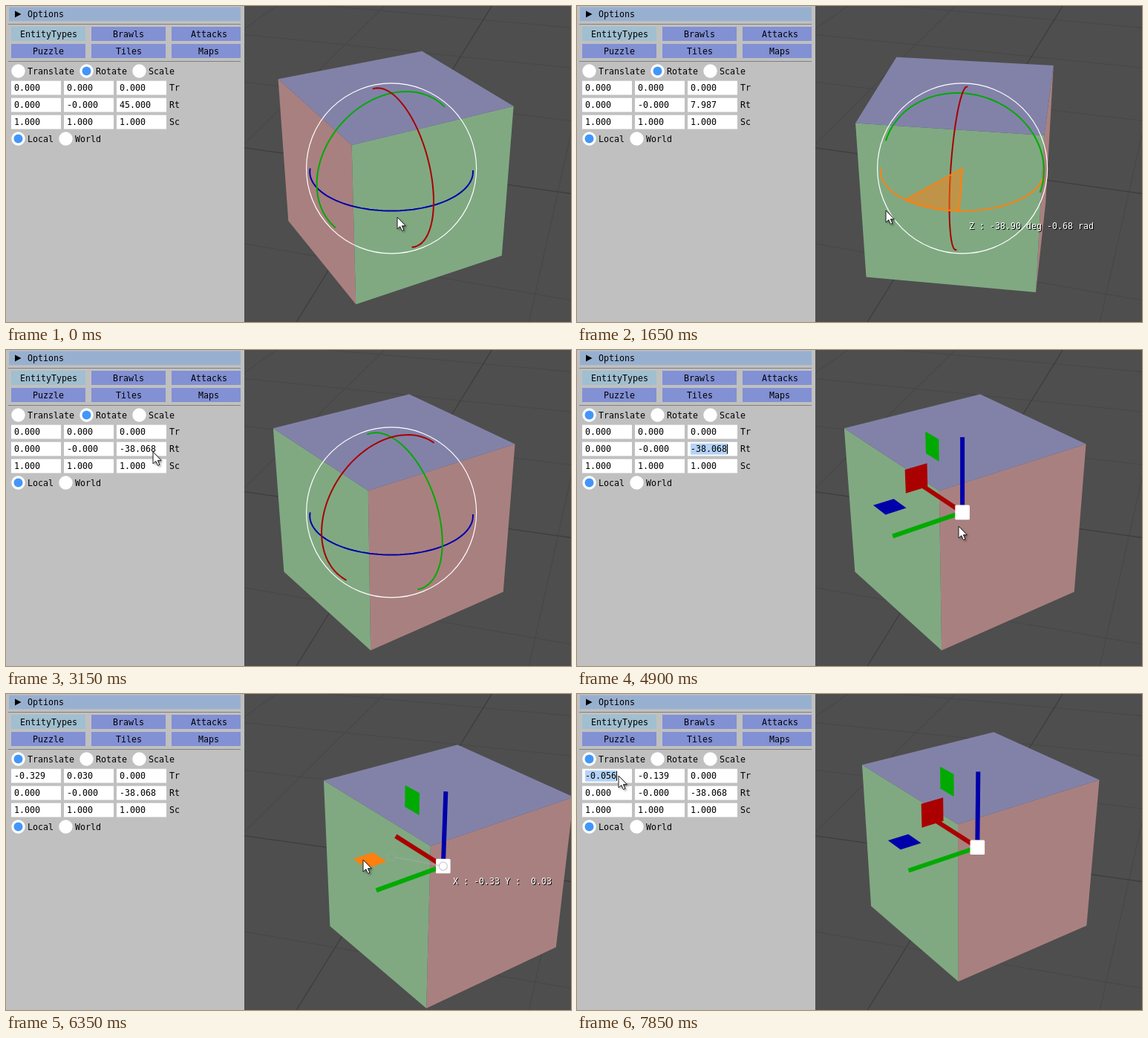
Recreate the animation shown at these times as an HTML page with a canvas. Size 761x425 px, loop 8 s.

```html
<!DOCTYPE html>
<html lang="en">
<head>
<meta charset="utf-8">
<title>Gizmo editor</title>
<style>
  html, body { margin: 0; width: 100%; height: 100%; overflow: hidden; background: #4e4e4e; }
  canvas { display: block; }
</style>
</head>
<body>
<canvas id="stage" width="761" height="425"></canvas>
<script>
const ctx = document.getElementById('stage').getContext('2d');
const LOOP = 8000, STEP = 50, RAD = Math.PI / 180;

// Orbit camera aimed at the origin; u = right, v = away, z = up.
const CAM = { x: 519.1, y: 218.4, focal: 1081, dist: 4.87, c: 0.88, s: 0.4755, yaw: 163.6 };
const RING = 0.493;          // gizmo size in world units at the origin
const GRAB = 268;            // direction where the ring is grabbed
const RED = '#aa0000', GREEN = '#00aa00', BLUE = '#0000aa', ORANGE = '#ff8010';
const GHOST = 'rgba(170,170,170,.6)';

const TURN = [500, 2800], SLIDE = [5600, 7150], SWITCH = 4650;
const during = (t, [from, to]) => t >= from && t < to;

// Keys: [time, value...]
const SPIN = [[450, 45], [850, 37.242], [1650, 7.987], [2600, -38.068]];
const SHIFT = [[5550, 0, 0], [6350, -0.329, 0.03], [7050, -0.056, -0.139]];
// Free pointer moves: [from, to, x, y]
const REST = [527, 284];
const MOVES = [[50, 150, 516, 277], [2800, 3150, 198, 137], [3650, 3900, 122, 110],
  [3900, 4450, 514, 237], [4900, 5300, 414, 211], [7150, 7500, 140, 66], [7500, 7700, 56, 110]];

const clamp = (v, lo, hi) => Math.min(hi, Math.max(lo, v));
const mix = (a, b, k) => a.map((v, i) => v + (b[i] - v) * k);
const smooth = k => k * k * (3 - 2 * k);

function at(keys, t) {
  const i = clamp(keys.findLastIndex(k => k[0] <= t), 0, keys.length - 2);
  const [t0, ...a] = keys[i], [t1, ...b] = keys[i + 1];
  return mix(a, b, clamp((t - t0) / (t1 - t0), 0, 1));
}

const depth = p => CAM.dist + p[1] * CAM.c - p[2] * CAM.s;

function project(p) {
  const k = CAM.focal / depth(p);
  return [CAM.x + p[0] * k, CAM.y - (p[2] * CAM.c + p[1] * CAM.s) * k];
}

// Maps local coordinates to the camera-aligned world
function frame(deg, pos = [0, 0, 0]) {
  const a = (deg + CAM.yaw) * RAD, c = Math.cos(a), s = Math.sin(a);
  return (x, y, z) => [pos[0] + x * c - y * s, pos[1] + x * s + y * c, pos[2] + z];
}
const ground = (deg, r) => project([r * Math.cos(deg * RAD), r * Math.sin(deg * RAD), 0]);

const spin = t => at(SPIN, t)[0];
const place = t => frame(0)(...at(SHIFT, t), 0);
// the readout runs a little ahead of the cube
const swept = t => Math.max((spin(t) - 45) * 1.005 - 1.7, -83.07);

function pointer(t) {
  if (during(t, TURN)) {
    const deg = swept(t);
    return ground(GRAB + deg, Math.min(0.5 - deg * 0.0037, 0.645));
  }
  if (during(t, SLIDE)) {
    const [u, v] = place(t);
    return project([u - 0.478, v + 0.077, 0]);
  }
  const move = MOVES.findLast(m => m[0] <= t);
  if (!move) return REST;
  const [from, to, ...end] = move;
  return mix(pointer(from - STEP), end, smooth(clamp((t - from) / (to - from), 0, 1)));
}

function trace(points, close) {
  ctx.beginPath();
  points.forEach(p => ctx.lineTo(p[0], p[1]));
  if (close) ctx.closePath();
}
function fill(points, color) {
  trace(points, true);
  ctx.fillStyle = color;
  ctx.fill();
}
function line(points, color, width, close) {
  trace(points, close);
  ctx.strokeStyle = color;
  ctx.lineWidth = width;
  ctx.stroke();
}
function box(x, y, w, h, color) {
  ctx.fillStyle = color;
  ctx.fillRect(x, y, w, h);
}
function disc(x, y, r, color) {
  ctx.beginPath();
  ctx.arc(x, y, r, 0, 7);
  ctx.fillStyle = color;
  ctx.fill();
}
function ring(x, y, r, color, width) {
  ctx.beginPath();
  ctx.arc(x, y, r, 0, 7);
  ctx.strokeStyle = color;
  ctx.lineWidth = width;
  ctx.stroke();
}
function text(s, x, y, color = '#000') {
  ctx.fillStyle = color;
  ctx.fillText(s, x, y);
}
function label(s, x, y) {
  text(s, x + 1, y + 1);
  text(s, x, y, '#fff');
}
const num = v => v.toFixed(2).padStart(5);

function drawGrid() {
  const w = frame(0), N = 10;
  for (let i = -N; i <= N; i++) {
    for (const along of [true, false]) {
      const pts = [];
      for (let j = -N; j <= N; j += 0.25) {
        const p = along ? w(j, i, 0) : w(i, j, 0);
        if (depth(p) > 0.6) pts.push(project(p));
      }
      line(pts, i ? '#484848' : '#3d3d3d', 1.3);
    }
  }
}

function drawCube(w) {
  const h = 0.5, corners = [[-h, -h], [h, -h], [h, h], [-h, h]];
  const side = (nx, ny) => corners.map(([a, z]) => project(w(nx * h - ny * a, ny * h + nx * a, z)));
  const faces = [
    [side(1, 0), '#a98080'], [side(-1, 0), '#a98080'],
    [side(0, 1), '#80a982'], [side(0, -1), '#80a982'],
    [corners.map(([x, y]) => project(w(x, y, h))), '#8282a9']
  ];
  for (const [[a, b, c, d], color] of faces) {
    const turn = (b[0] - a[0]) * (c[1] - a[1]) - (b[1] - a[1]) * (c[0] - a[0]);
    if (turn < 0) fill([a, b, c, d], color);
  }
}

function drawRotate(t) {
  const rt = spin(t), w = frame(rt), a = (rt + CAM.yaw) * RAD;
  // viewing direction in local axes
  const view = [CAM.c * Math.sin(a), CAM.c * Math.cos(a), -CAM.s];
  const hot = t >= 100 && t < TURN[1];
  const colors = [hot ? ORANGE : BLUE, GREEN, RED];
  colors.forEach((color, axis) => {
    const p = (3 - axis) % 3, q = (4 - axis) % 3;
    const start = Math.atan2(view[q], view[p]) + Math.PI / 2, pts = [];
    for (let i = 0; i < 64; i++) {
      const g = start + Math.PI * i / 64, v = [0, 0, 0];
      v[p] = RING * Math.cos(g);
      v[q] = RING * Math.sin(g);
      pts.push(project(w(...v)));
    }
    line(pts, color, 2);
  });
  ring(CAM.x, CAM.y, 114.5, '#fff', 1.2);
  if (!during(t, TURN)) return;

  const deg = swept(t), pie = [ground(0, 0)];
  for (let i = 0; i <= 40; i++) pie.push(ground(GRAB + deg * i / 40, RING));
  fill(pie, 'rgba(255,128,16,.5)');
  line(pie, ORANGE, 2, true);
  label(`Z : ${num(deg)} deg ${num(deg * RAD)} rad`, 528, 300);
}

function drawTranslate(t) {
  const pos = place(t), w = frame(spin(t), pos), [x, y] = project(pos);
  const drag = during(t, SLIDE), hot = t >= 5200 && t < SLIDE[1];
  const size = RING * depth(pos) / CAM.dist;
  [RED, GREEN, BLUE].forEach((color, axis) => {
    const point = (a, b, c) => {
      const v = [0, 0, 0];
      [a, b, c].forEach((k, i) => v[(axis + i) % 3] = k * size);
      return project(w(...v));
    };
    line([point(0.1, 0, 0), point(1, 0, 0)], color, 6);
    if (drag && color === RED) return;
    const lo = 0.5, hi = 0.8;
    const quad = [point(0, lo, lo), point(0, lo, hi), point(0, hi, hi), point(0, hi, lo)];
    fill(quad, hot && color === BLUE ? ORANGE : color);
  });
  ctx.beginPath();
  ctx.roundRect(x - 9.8, y - 9.8, 19.6, 19.6, 1.5);
  ctx.fillStyle = '#fff';
  ctx.fill();
  if (!drag) return;

  const dx = x - CAM.x, dy = y - CAM.y, gap = 5 / (Math.hypot(dx, dy) || 1);
  ring(CAM.x, CAM.y, 5.5, 'rgba(170,170,170,.3)', 1);
  ring(x, y, 5.5, GHOST, 1.3);
  if (gap < 0.5) line([gap, 1 - gap].map(k => [CAM.x + dx * k, CAM.y + dy * k]), GHOST, 1.4);
  const [tx, ty] = at(SHIFT, t);
  label(`X : ${num(tx)} Y : ${num(ty)}`, Math.round(x + 13.5), Math.round(y + 24.3));
}

function radio(x, y, name, on) {
  disc(x, y, 9.2, '#fff');
  if (on) disc(x, y, 6, '#4296fa');
  text(name, Math.round(x + 12), y + 4.5);
}

function field(x, y, s, caret) {
  const w = s.length * 7;
  box(x, y, 67, 18.8, '#fff');
  if (caret >= 0) box(x + 4, y + 2, w, 15, '#b4d3f7');
  text(s, x + 4, Math.round(y + 13.3));
  if (caret >= 0 && (caret + 100) % 1200 < 800) box(x + 4 + w, y + 3, 1, 13, '#000');
}

function drawPanel(t) {
  box(0, 0, 321, 425, 'rgba(195,195,195,.975)');
  box(4, 1.5, 312, 18.8, '#98b0cf');
  fill([[12, 6.5], [20.5, 11], [12, 15.5]], '#000');
  text('Options', 29, 15);
  for (const y of [24, 74]) box(3, y, 313, 1, '#808080');

  ['EntityTypes', 'Brawls', 'Attacks', 'Puzzle', 'Tiles', 'Maps'].forEach((name, i) => {
    const x = 7 + i % 3 * 108, y = i < 3 ? 28 : 51;
    box(x, y, Math.min(100, 316 - x), 19, i ? '#8290d4' : '#a0bfd0');
    text(name, Math.round(x + 50 - name.length * 3.5), y + 14);
  });

  radio(16.5, 87.5, 'Translate', t >= SWITCH);
  radio(108.5, 87.5, 'Rotate', t < SWITCH);
  radio(179.5, 87.5, 'Scale', false);
  radio(16.5, 178.5, 'Local', true);
  radio(80.5, 178.5, 'World', false);

  const [tx, ty] = at(SHIFT, t);
  const rows = { Tr: [tx, ty, 0], Rt: [0, -1e-6, spin(t)], Sc: [1, 1, 1] };
  Object.entries(rows).forEach(([name, values], r) => {
    const y = 100.7 + r * 23;
    values.forEach((v, c) => {
      let caret = -1;
      if (name === 'Rt' && c === 2 && t < SLIDE[0]) caret = t - 3400;
      if (name === 'Tr' && c === 0) caret = t - 7850;
      field(7 + c * 71, y, v.toFixed(3), caret);
    });
    text(name, 220, Math.round(y + 13.3));
  });
}

function drawPointer([x, y]) {
  const arrow = [[0, 0], [0, 16], [3.8, 12.6], [6.4, 18.4], [8.9, 17.3], [6.4, 11.7], [11.3, 11.7]]
    .map(p => [p[0] + x, p[1] + y]);
  ctx.save();
  ctx.shadowColor = 'rgba(0,0,0,.45)';
  ctx.shadowBlur = 3;
  ctx.shadowOffsetX = ctx.shadowOffsetY = 2;
  fill(arrow, '#fff');
  ctx.restore();
  line(arrow, '#1a1a1a', 1, true);
}

function draw(t) {
  box(0, 0, 761, 425, '#4e4e4e');
  drawGrid();
  drawCube(frame(spin(t), place(t)));
  (t < SWITCH ? drawRotate : drawTranslate)(t);
  drawPanel(t);
  drawPointer(pointer(t).map(Math.round));
}

ctx.font = '11.63px "DejaVu Sans Mono", "Liberation Mono", monospace';
const begin = performance.now();
function tick() {
  const t = (performance.now() - begin) % LOOP;
  draw(Math.floor(t / STEP) * STEP);
  requestAnimationFrame(tick);
}
tick();
</script>
</body>
</html>
```
